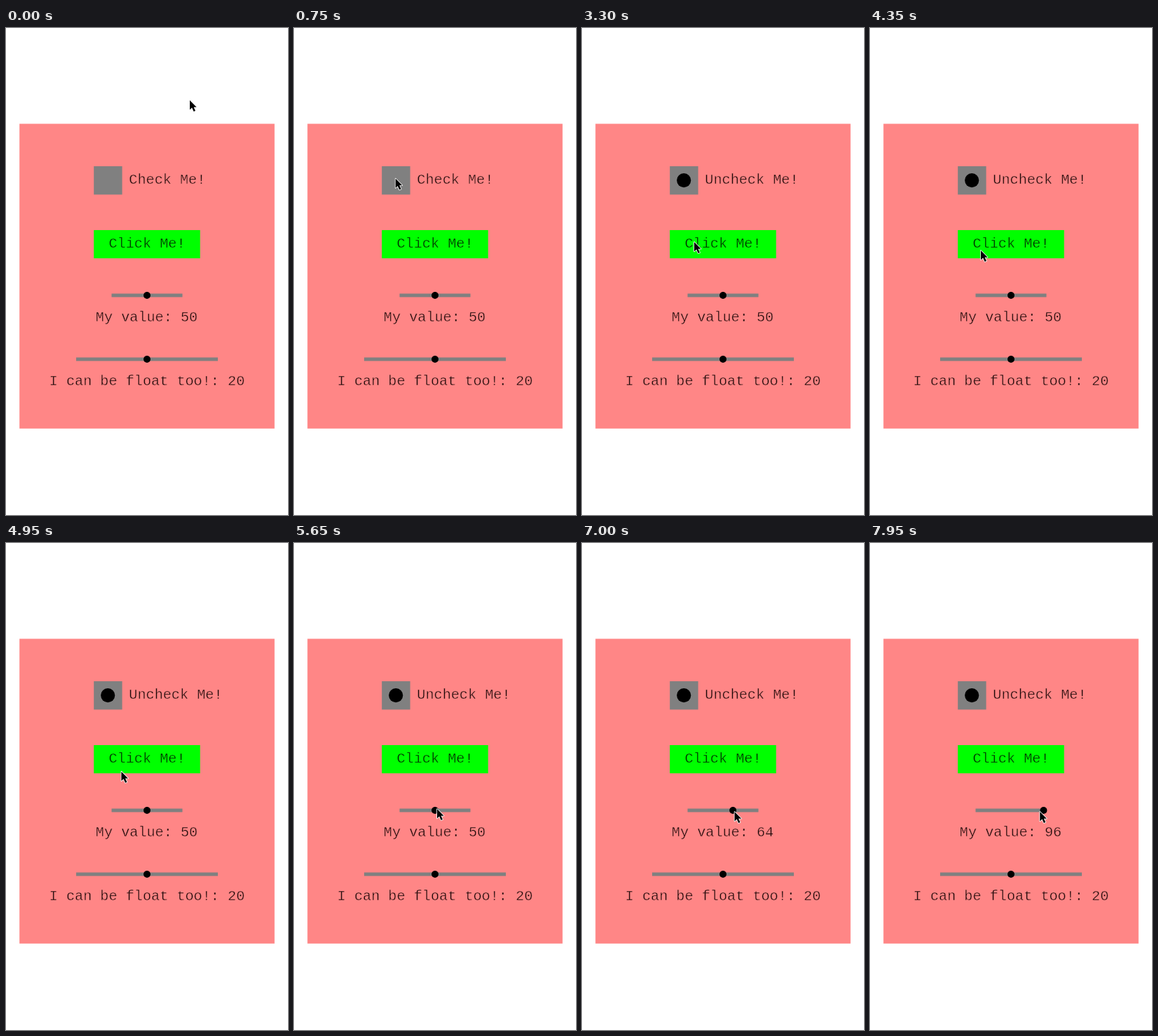
Recreate the animation shown at these times as an HTML page. Size 402 by 694 pixels, loop 8000 ms.

```html
<!DOCTYPE html>
<html lang="en">
<head>
<meta charset="utf-8">
<title>Interface controls</title>
<style>
  html, body { margin: 0; height: 100%; overflow: hidden; background: #fff; }
  svg { display: block; width: 100vw; height: 100vh; }
  /* A hairline in the background colour keeps the lettering thin. */
  text { font: 20.2px "Liberation Mono", "Courier New", monospace; fill: #1c0808; stroke: #ff8686; stroke-width: .45; }
  .onGreen { fill: #002400; stroke: #0f0; }
  .middle { text-anchor: middle; }
  .track { stroke: #808080; stroke-width: 5; }
</style>
</head>
<body>
<svg viewBox="0 0 402 694">
  <rect x="19.2" y="136.5" width="363.6" height="434.3" fill="#ff8686"/>

  <rect x="125.2" y="197" width="40.4" height="40.4" fill="#808080"/>
  <circle id="dot" cx="145.2" cy="217.1" r="10.1"/>
  <text id="checkLabel" x="175.3" y="222"></text>

  <rect x="125.2" y="288" width="151.5" height="40.2" fill="#0f0"/>
  <text class="middle onGreen" x="201" y="313">Click Me!</text>

  <path class="track" d="M150.5 381H251.5"/>
  <circle id="knob" cy="381" r="5"/>
  <text id="valueLabel" class="middle" x="200.5" y="418"></text>

  <path class="track" d="M100 472H302"/>
  <circle cx="201" cy="472" r="5"/>
  <text class="middle" x="201" y="509">I can be float too!: 20</text>

  <path id="pointer" d="M0 0V13.4L3.1 10.6L5.6 16L8 15L5.6 9.7H9.6Z"
        stroke="#fff" stroke-width="1.6" paint-order="stroke" stroke-linejoin="round"/>
</svg>
<script>
const LOOP = 8000, STEP = 50, DRAG_START = 5700;
const HAND_LEAD = 30;   // ms by which the pointer runs ahead of the knob

const $ = id => document.getElementById(id);
const clamp = (v, low, high) => Math.min(high, Math.max(low, v));
const sliderX = value => 150.5 + value * 1.01;

// 0 to 1 between two times, slow at both ends
function ease(t, from, to) {
  const u = clamp((t - from) / (to - from), 0, 1);
  return u * u * (3 - 2 * u);
}

// The hand swings past both ends of the slider.
const swing = t => 57 + 59 * Math.sin(Math.PI * (t - 6950) / 1300);

const glides = [
  { from: 0, to: 850, x: 140, y: 219 },      // checkbox
  { from: 2750, to: 3300, x: 160, y: 305 },  // button
  { from: 4200, to: 4350, x: 158, y: 317 },
  { from: 4750, to: 5600, x: 204, y: 379 }   // slider
];

function pointerAt(t) {
  if (t > DRAG_START) return { x: sliderX(swing(t + HAND_LEAD)) - 2, y: 383 };
  return glides.reduce((p, glide) => {
    const k = ease(t, glide.from, glide.to);
    return { x: p.x + (glide.x - p.x) * k, y: p.y + (glide.y - p.y) * k };
  }, { x: 262, y: 103 });
}

function isChecked(t) {
  return t >= 1050 && !(t >= 1800 && t < 2150);
}

function draw(t) {
  const checked = isChecked(t);
  $("dot").style.display = checked ? "" : "none";
  $("checkLabel").textContent = checked ? "Uncheck Me!" : "Check Me!";

  const value = t > DRAG_START ? Math.round(clamp(swing(t), 0, 100)) : 50;
  $("knob").setAttribute("cx", sliderX(value));
  $("valueLabel").textContent = "My value: " + value;

  const { x, y } = pointerAt(t);
  $("pointer").setAttribute("transform", `translate(${x} ${y})`);
}

const start = performance.now();
function frame() {
  const t = (performance.now() - start) % LOOP;
  draw(Math.floor(t / STEP) * STEP);
  requestAnimationFrame(frame);
}
frame();
</script>
</body>
</html>
```
